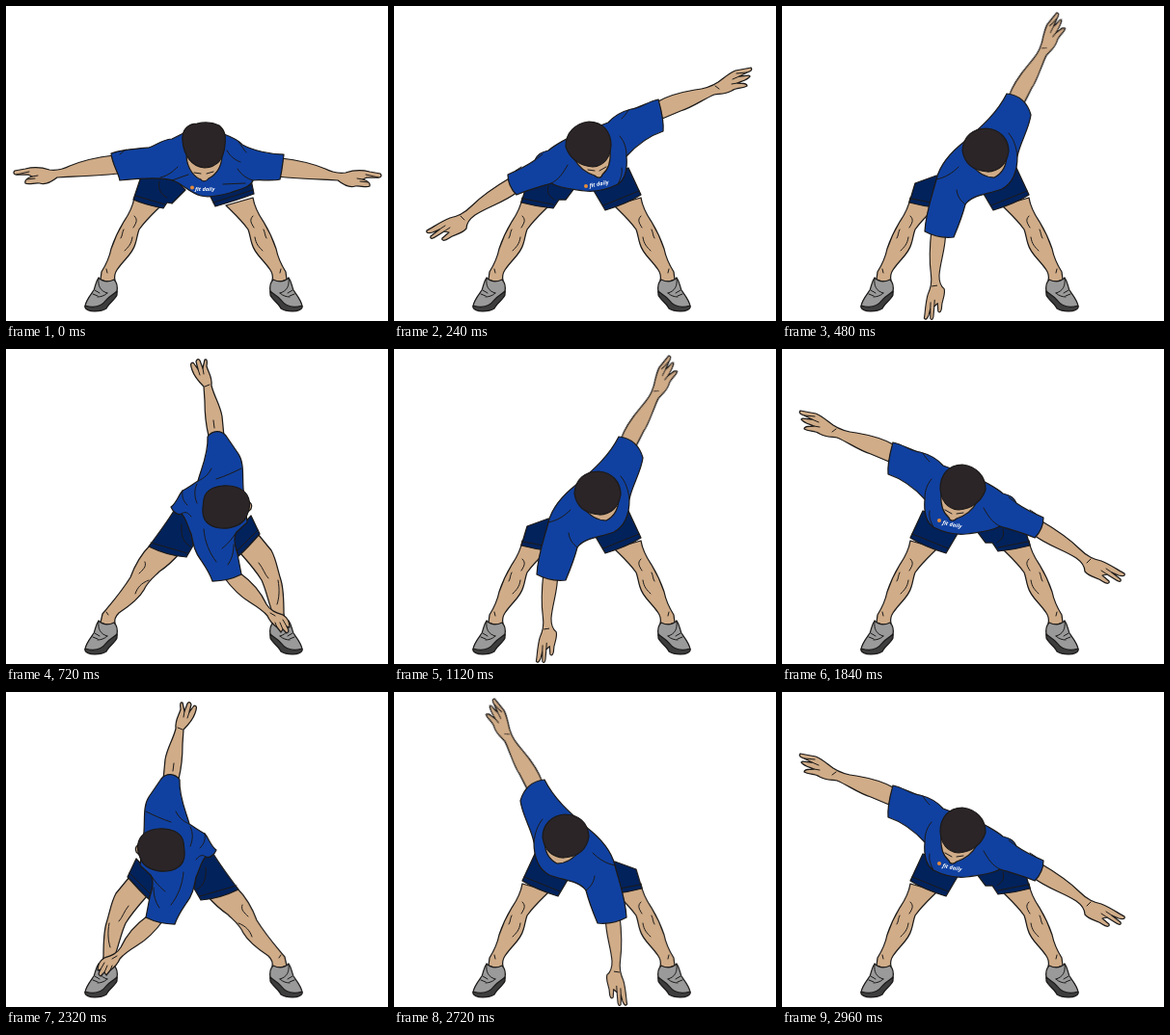
Recreate the animation shown at these times as an HTML page. Size 396 by 327 pixels, loop 3.2 s.

```html
<!DOCTYPE html>
<html lang="en">
<head>
<meta charset="utf-8">
<title>Windmill stretch</title>
<style>
  html, body { margin: 0; width: 100%; height: 100%; overflow: hidden; background: #fff; }
  svg { display: block; width: 100vw; height: 100vh; }
  path { stroke: #1c1a19; stroke-width: 1.25; stroke-linejoin: round; stroke-linecap: round; }
  .skin { fill: #d0ac88; }
  .shirt { fill: #1041a1; }
  .shorts { fill: #02225c; }
  .hair { fill: #2c2527; }
  .shoe { fill: #9a9a9a; }
  .sole { fill: #3d3d3d; }
  .line { fill: none; stroke-width: 1; }
  .mark { fill: #e58b3c; }
  text { font: italic bold 5.6px "Open Sans", sans-serif; fill: #fff; }

  /* One side of the stretch lasts 1600 ms; the second side is its mirror image. */
  .pose { animation: 1600ms step-end infinite; }
  .level { animation-name: level; }
  .tilt { animation-name: tilt; }
  .swing { animation-name: swing; }
  .touch { animation-name: touch; }
  #side { animation: flip 3200ms step-end infinite; }
  .first, .second { animation: half 3200ms step-end infinite; }
  .second { animation-delay: -1600ms; }

  @keyframes level { 0% { visibility: visible } 15%, 100% { visibility: hidden } }
  @keyframes tilt {
    0% { visibility: hidden } 15% { visibility: visible }
    30% { visibility: hidden } 85%, 100% { visibility: visible }
  }
  @keyframes swing {
    0% { visibility: hidden } 30% { visibility: visible } 45% { visibility: hidden }
    70% { visibility: visible } 85%, 100% { visibility: hidden }
  }
  @keyframes touch {
    0% { visibility: hidden } 45% { visibility: visible } 70%, 100% { visibility: hidden }
  }
  @keyframes flip { 0% { transform: none } 50%, 100% { transform: translate(389px, 0) scale(-1, 1) } }
  @keyframes half { 0% { opacity: 1 } 50%, 100% { opacity: 0 } }
</style>
</head>
<body>
<svg viewBox="0 0 396 327" preserveAspectRatio="none">
  <defs>
    <g id="shoe">
      <path class="shoe" d="M96 282C93 286 93 290 91 295C86 302 82 307 82 312C85 317 97 318 103 313C108 306 114 303 115 297C116 291 114 286 112 284C106 287 100 286 96 282Z"/>
      <path class="sole" d="M82 311C92 314 99 312 104 305C107 301 112 299 115 296L115 300C113 305 106 309 104 314C98 318 84 318 82 313Z"/>
      <path class="line" d="M96 283C95 291 98 296 105 298M92 295L97 298M90 299L95 301M105 298C102 301 98 302 95 302"/>
    </g>
    <g id="shoes"><use href="#shoe"/><use href="#shoe" transform="translate(389) scale(-1 1)"/></g>

    <g id="leg">
      <path class="skin" d="M133 199C131 211 126 218 122 224C116 234 112 243 109 252C107 262 104 268 99 276L98 284C104 287 108 287 113 285C112 281 113 277 115 274C123 262 131 258 134 247C136 241 136 237 138 232C145 222 153 215 161 207Z"/>
      <path class="line" d="M133 218C137 222 135 225 132 230M122 232C120 236 121 238 119 241M131 240C130 247 127 250 123 254M104 273L105 277"/>
    </g>
    <g id="legs">
      <use href="#leg"/><use href="#leg" transform="translate(389) scale(-1 1)"/>
      <use href="#shoes"/>
    </g>

    <g id="levelArm">
      <path class="skin" d="M112 155C94 157 78 161 66 166C58 170 52 171 45 170C36 167 28 167 20 169L9 171C7 173 8 175 11 175L23 175L27 177C21 179 19 181 20 184C24 186 30 183 35 184C41 186 48 182 53 178C68 177 90 177 116 174Z"/>
      <path class="line" d="M11 175L24 172M27 177L33 176M22 180L30 179"/>
    </g>
    <g id="lowArm">
      <path class="skin" d="M121 178C104 188 90 198 80 208C72 216 66 218 58 220C48 224 40 230 34 233C33 236 36 236 40 235L47 232L38 239C37 242 40 242 44 239L52 234L57 235L50 241C49 244 53 244 57 241C62 237 70 237 75 231C75 226 77 222 84 217C98 208 114 204 128 193Z"/>
      <path class="line" d="M47 232L53 228M52 234L58 230M69 218L73 222"/>
    </g>
    <g id="highArm">
      <path class="skin" d="M272 100C285 92 300 89 312 87C322 86 330 83 336 79C343 74 347 70 354 67L370 64C372 66 370 68 366 69L358 73C364 73 369 71 369 73C366 77 360 78 356 80C361 80 366 80 366 83C361 86 355 84 350 88C343 92 338 91 332 92C322 96 308 106 297 109L278 117Z"/>
      <path class="line" d="M358 73L351 76M356 80L350 81M333 83L337 86M366 69L355 70"/>
    </g>
    <g id="tiltShorts">
      <path class="shorts" d="M138 184L132 204C143 207 154 209 165 210L171 201L178 201L187 189L160 176Z"/>
      <path class="shorts" d="M206 190L219 212C232 208 245 203 256 196L243 168L230 172Z"/>
      <path class="line" d="M134 200L165 206M217 207L254 192M160 187C158 195 161 197 166 201"/>
    </g>
  </defs>

  <g class="pose level">
    <use href="#legs"/>
    <path class="shorts" d="M141 174L132 201C143 206 153 208 163 210L167 204L172 205L186 191L172 176Z"/>
    <path class="shorts" d="M210 194L217 208C231 204 244 200 257 195L254 180Z"/>
    <path class="line" d="M134 197L165 206M215 204L256 191M159 182C157 190 161 196 167 199"/>
    <use href="#levelArm"/>
    <use href="#levelArm" transform="translate(397 3) scale(-1 1)"/>
    <path class="shirt" d="M109 153C120 149 135 148 148 147C156 145 160 139 172 138L184 132L226 133C234 136 241 139 245 144C256 150 274 154 288 154C287 163 286 172 284 180C275 182 264 180 256 181C253 189 242 190 232 194C221 197 210 199 202 197C190 194 184 185 173 181C160 177 136 179 118 181C116 172 110 164 109 153Z"/>
    <path class="line" d="M160 178C168 176 173 172 178 167M172 181L189 175M118 154L124 149M256 181C249 179 244 175 240 169M241 141C245 146 247 150 249 152M229 150C233 157 238 160 243 162M225 185L248 184"/>
    <path class="skin" d="M187 156C188 170 196 178 202 180C204 183 208 182 210 179C216 176 223 169 224 156Z"/>
    <path class="line" d="M195 173L202 174M208 174L215 172"/>
    <path class="hair" d="M183 140C182 127 190 122 198 122C206 120 215 121 221 124C227 129 228 135 227 144C226 157 220 167 206 168C192 167 184 154 183 140Z"/>
    <circle class="mark" cx="193" cy="188.5" r="2"/>
    <text x="196" y="191.5">fit daily</text>
  </g>

  <g id="side">
    <g class="pose tilt">
      <use href="#legs"/>
      <use href="#tiltShorts"/>
      <use href="#lowArm"/>
      <use href="#highArm"/>
      <path class="shirt" d="M274 97C277 108 280 118 279 130C264 135 252 144 241 156C242 168 241 179 232 185C220 191 208 193 198 192C186 190 174 190 163 184C150 188 139 191 127 196C121 190 118 183 118 175C127 171 139 165 146 160C149 154 152 152 160 150C167 144 174 141 182 136L222 121C229 113 238 109 246 107C254 106 264 99 274 97Z"/>
      <path class="line" d="M163 184C171 180 175 174 180 165M146 160L154 154M241 156C241 147 239 141 234 135M243 108C241 112 238 115 236 117M232 185C235 179 237 174 236 168M126 171L132 167"/>
      <path class="skin" d="M187 159C193 170 202 174 208 176C211 179 215 179 216 175C222 170 225 162 224 150Z"/>
      <path class="line" d="M201 170L208 171M213 171L220 167"/>
      <path class="hair" d="M178 146C178 131 188 122 202 120C216 120 225 130 225 145C224 157 218 166 206 167C192 166 182 158 178 146Z"/>
    </g>

    <g class="pose swing">
      <use href="#legs"/>
      <use href="#tiltShorts"/>
      <use href="#lowArm" transform="translate(162 236) rotate(-53) scale(.9) translate(-122 -187)"/>
      <use href="#highArm" transform="translate(243 96) rotate(-40) scale(.96) translate(-277 -107)"/>
      <path class="shirt" d="M233 91C246 92 255 101 258 113C256 128 247 141 244 156C244 173 239 184 228 190C212 196 197 196 190 206C187 218 183 228 178 240C168 241 157 239 148 234C149 214 156 196 160 180C164 163 177 150 190 140C207 125 223 111 233 91Z"/>
      <path class="line" d="M160 180C170 178 177 173 183 167M190 206C185 202 182 198 181 191M244 156C243 146 240 138 235 132"/>
      <path class="skin" d="M196 164C204 175 213 178 220 178C228 174 233 166 233 154Z"/>
      <path class="hair" d="M187 150C188 135 198 127 212 127C226 128 235 138 235 151C233 164 225 172 213 172C198 171 189 163 187 150Z"/>
    </g>

    <g class="pose touch">
      <path class="skin" d="M150 203C139 214 133 226 129 237C119 253 110 263 100 275L98 284C104 287 108 287 113 285C112 281 114 277 117 274C129 266 138 259 143 250C147 241 153 237 159 231C168 225 174 219 180 212Z"/>
      <path class="skin" d="M243 212C251 221 259 230 265 240C270 251 272 263 276 273L276 284C281 287 286 286 290 284L288 275C288 261 288 250 285 240C281 227 280 218 275 209L261 192Z"/>
      <path class="line" d="M144 221C146 226 142 229 138 233M148 240C140 243 136 248 134 254M104 273L106 276M262 222C267 228 268 234 272 238M282 240C284 250 283 259 281 265"/>
      <use href="#shoes"/>
      <path class="shorts" d="M174 168C166 181 157 193 148 205C160 211 173 215 187 216L194 204L190 174Z"/>
      <path class="shorts" d="M254 173L263 192C256 200 249 208 241 215L234 195Z"/>
      <path class="line" d="M150 201L188 212M239 210L261 188M182 182C181 194 184 201 191 205"/>
      <path class="skin" d="M226 237C234 248 243 257 253 263C261 268 267 272 271 277C273 282 277 286 281 289L285 294L287 291L291 295C294 294 293 291 291 288L294 289C294 284 292 279 287 276C281 274 274 272 270 265C265 254 257 243 243 233Z"/>
      <path class="line" d="M274 274L279 277M281 289L279 284M287 291L284 284M291 288L287 281"/>
      <path class="skin" d="M210 90C207 78 206 66 206 54L205 39C200 34 195 28 193 22C191 16 191 14 194 14L199 21L197 13C198 10 200 10 201 12L204 20L206 11C208 10 209 12 208 18C210 25 214 29 213 38C216 50 222 58 224 70L226 91Z"/>
      <path class="line" d="M199 21L201 27M204 20L205 26M206 39L211 37M215 74L216 82"/>
      <path class="shirt" d="M209 91C214 84 223 84 228 90L241 109C247 118 245 132 246 145L250 180L239 190C235 197 238 206 240 213L244 234C234 239 225 241 214 241C211 232 206 225 202 219C195 210 194 201 192 192C188 184 187 176 182 171C178 173 173 169 171 164C177 160 178 153 183 147C189 144 194 140 199 137C202 125 210 109 209 91Z"/>
      <path class="line" d="M199 137C206 134 210 130 213 124M218 135C227 132 236 128 244 124M183 147C182 154 184 158 188 162M198 140C195 146 195 153 198 160M182 171C186 168 189 170 192 174M239 190C233 199 229 203 224 207M236 203C236 212 234 218 230 224M205 187C206 200 211 212 218 221"/>
      <path class="skin" d="M249 157C254 159 256 162 254 166L248 172Z"/>
      <path class="hair" d="M205 156C207 145 219 141 231 142C243 143 250 148 252 157C254 162 252 167 250 172C247 182 235 187 222 186C208 184 203 176 204 165Z"/>
    </g>
  </g>

  <g class="pose tilt">
    <g class="first">
      <circle class="mark" cx="199" cy="187" r="2"/>
      <text transform="translate(203 188.5) rotate(-11)">fit daily</text>
    </g>
    <g class="second">
      <circle class="mark" cx="163" cy="178" r="2"/>
      <text transform="translate(166 182) rotate(12)">fit daily</text>
    </g>
  </g>
</svg>
</body>
</html>
```
